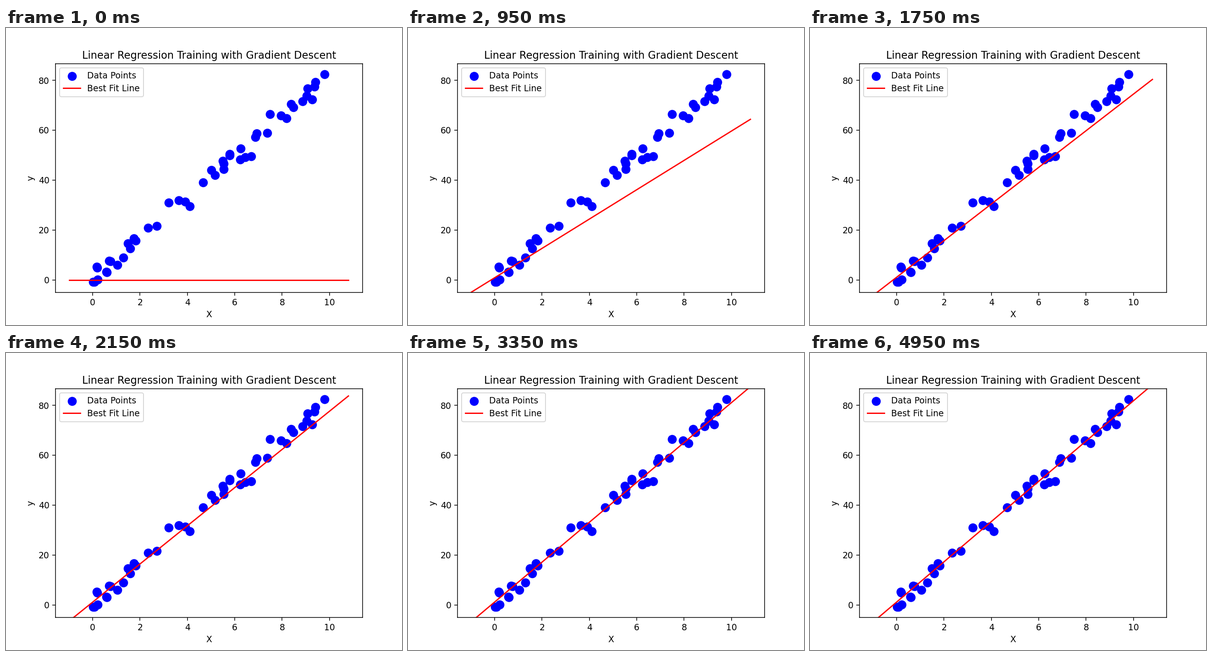
A matplotlib script that plays this animation: 864 by 648 pixels, repeating every 5 s.

```python
import matplotlib.pyplot as plt
import numpy as np
from matplotlib.animation import FuncAnimation

FRAMES = 100
INTERVAL = 50
RATE = 0.002

X = np.array([
    0.02, 0.07, 0.21, 0.17, 0.19, 0.57, 0.60, 0.69, 0.75, 1.04, 1.29, 1.48,
    1.58, 1.74, 1.82, 2.34, 2.70, 3.21, 3.64, 3.90, 4.10, 4.67, 5.01, 5.17,
    5.49, 5.53, 5.53, 5.79, 5.79, 6.23, 6.25, 6.44, 6.69, 6.87, 6.93, 7.37,
    7.48, 7.95, 8.19, 8.37, 8.47, 8.86, 9.04, 9.07, 9.27, 9.36, 9.40, 9.80])
Y = np.array([
    -0.85, -0.83, 0.09, 5.24, 4.78, 3.20, 2.94, 7.62, 7.53, 5.97, 9.00, 14.6,
    12.6, 16.6, 15.7, 20.8, 21.5, 30.9, 31.8, 31.4, 29.5, 39.1, 44.0, 42.0,
    47.7, 46.6, 44.4, 50.5, 49.9, 48.3, 52.6, 49.05, 49.5, 57.2, 58.7, 58.9,
    66.4, 65.8, 64.7, 70.5, 69.2, 71.55, 73.75, 76.7, 72.2, 77.4, 79.2, 82.4])


def train(steps):
    """Return the (slope, intercept) pairs of each gradient descent step."""
    w = b = 0.0
    path = []
    for _ in range(steps):
        path.append((w, b))
        error = w * X + b - Y
        w -= RATE * np.mean(error * X)
        b -= RATE * np.mean(error)
    return path


path = train(FRAMES)
line_x = np.array([X.min() - 1, X.max() + 1])

fig, ax = plt.subplots(figsize=(6.4, 4.8), dpi=135)
ax.scatter(X, Y, s=90, color="blue", label="Data Points")
line, = ax.plot(line_x, 0 * line_x, color="red", label="Best Fit Line")
ax.set_xlim(-1.57, 11.39)
ax.set_ylim(-5.0, 86.66)
ax.set_xlabel("X")
ax.set_ylabel("y")
ax.set_title("Linear Regression Training with Gradient Descent")
ax.legend(loc="upper left")


def update(frame):
    w, b = path[frame]
    line.set_ydata(w * line_x + b)
    return line,


anim = FuncAnimation(fig, update, frames=FRAMES, interval=INTERVAL,
                     init_func=lambda: update(0), repeat=True)
plt.show()
```
